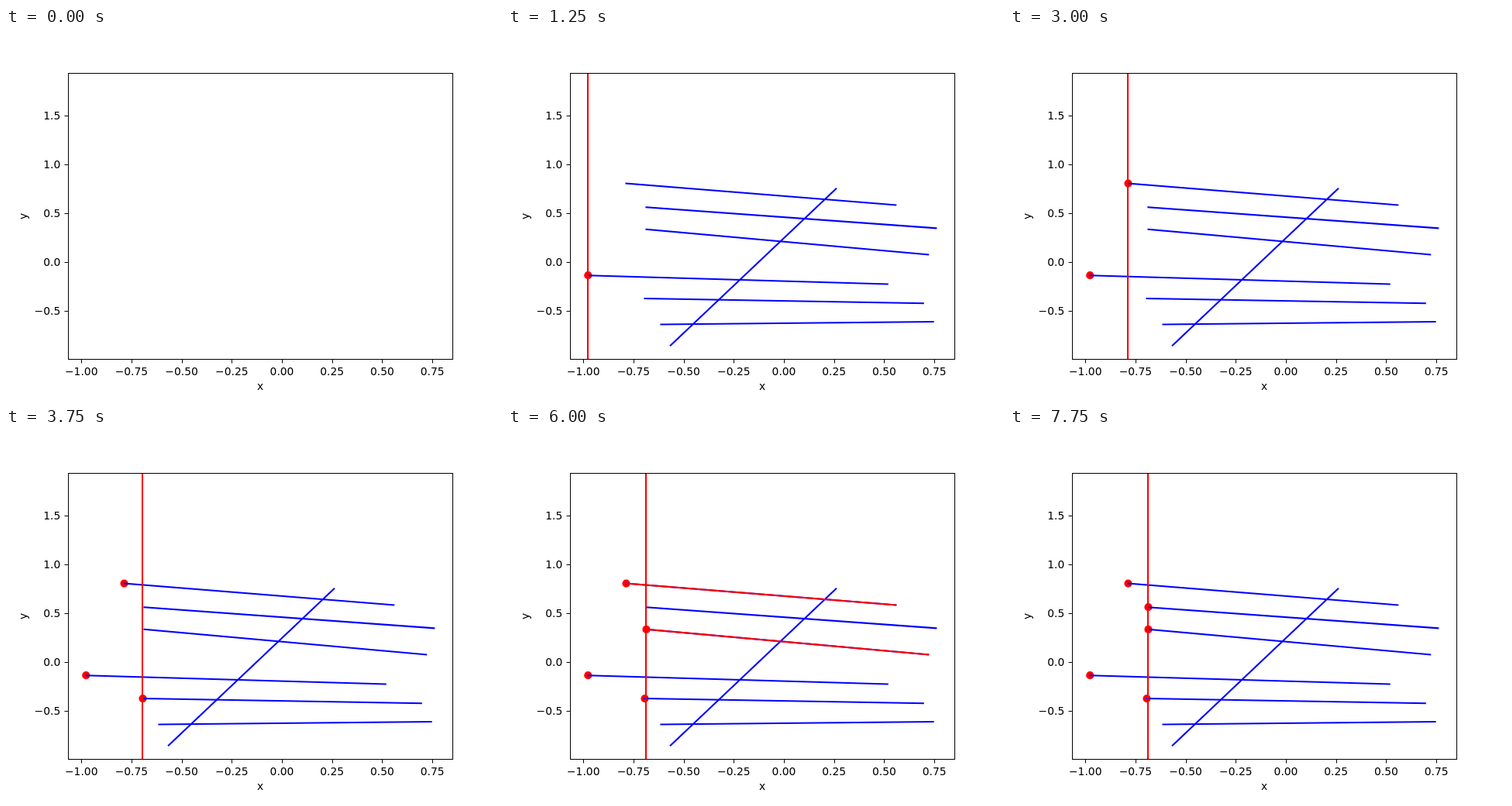
An HTML page with a canvas that plays this animation: 640 by 480 pixels, repeating every 8 s.

```html
<!DOCTYPE html>
<html>
<head>
<meta charset="utf-8">
<style>
html, body { margin: 0; width: 100%; height: 100%; overflow: hidden; background: #fff; }
canvas { display: block; }
</style>
</head>
<body>
<canvas id="stage" width="640" height="480"></canvas>
<script>
const ctx = document.getElementById('stage').getContext('2d');
const STEP = 250, LOOP = 8000;

// Segments as [x1, y1, x2, y2], in the order the sweep meets them
const segments = [
  [103.3, 319.2, 489.7, 330.5],
  [152.5, 200.6, 500.3, 228.4],
  [176.5, 349.1, 535.8, 355.2],
  [178.5, 259.9, 542.2, 292.4],
  [178.5, 231.2, 552.3, 258.3],
  [197.5, 382.5, 548.6, 379.0],
  [209.8, 409.5, 423.2, 207.5]
];
// Active neighbours of each segment when it is inserted
const neighbours = [[], [0], [0], [1, 0], [1, 3]];

// One toggle per step: dot, sweep line, highlights on and off again, line off
const toggles = ['all'];
neighbours.forEach((near, i) => {
  const marks = near.map(n => 'mark' + n);
  toggles.push('dot' + i, 'sweep' + i, 'mark' + i, ...marks, ...marks, 'mark' + i, 'sweep' + i);
});

function stateAt(step) {
  const on = new Set();
  for (const key of toggles.slice(0, step)) on.delete(key) || on.add(key);
  return on;
}

function line(x1, y1, x2, y2, color, width, cap = 'butt') {
  ctx.strokeStyle = color;
  ctx.lineWidth = width;
  ctx.lineCap = cap;
  ctx.beginPath();
  ctx.moveTo(x1, y1);
  ctx.lineTo(x2, y2);
  ctx.stroke();
}

function label(text, x, y, align = 'center') {
  ctx.textAlign = align;
  ctx.fillText(text.replace('-', '\u2212'), x, y);
}

function drawAxes() {
  ctx.fillStyle = '#000';
  ctx.font = '13.89px "DejaVu Sans", sans-serif';
  ctx.textBaseline = 'alphabetic';
  for (let i = 0; i < 8; i++) {
    const x = 97.2 + i * 64.7, px = Math.round(x) + 0.5;
    line(px, 428, px, 432.5, '#000', 1);
    label((i / 4 - 1).toFixed(2), x, 448);
  }
  for (let i = 0; i < 5; i++) {
    const y = 113 + i * 63;
    line(75.5, y + 0.5, 80, y + 0.5, '#000', 1);
    label((1.5 - i / 2).toFixed(1), 70.3, y + 5, 'right');
  }
  label('x', 328, 467);
  ctx.save();
  ctx.translate(27, 243);
  ctx.rotate(-Math.PI / 2);
  label('y', 0, 0);
  ctx.restore();
  ctx.strokeStyle = '#000';
  ctx.lineWidth = 1;
  ctx.strokeRect(80.5, 58.5, 496, 369);
}

function draw(step) {
  const on = stateAt(step);
  ctx.fillStyle = '#fff';
  ctx.fillRect(0, 0, 640, 480);
  ctx.fillStyle = '#f00';
  segments.forEach(([x, y], i) => {
    if (!on.has('dot' + i)) return;
    ctx.beginPath();
    ctx.arc(x, y, 5.1, 0, 2 * Math.PI);
    ctx.fill();
  });
  if (on.has('all')) segments.forEach(s => line(...s, '#00f', 2.08, 'square'));
  segments.forEach((s, i) => {
    const x = Math.floor(s[0]);
    if (on.has('sweep' + i)) line(x, 59, x, 427, '#f00', 2.08);
    if (on.has('mark' + i)) line(...s, '#f00', 2.08, 'square');
  });
  drawAxes();
}

function tick() {
  draw(Math.floor(performance.now() % LOOP / STEP));
  requestAnimationFrame(tick);
}
tick();
</script>
</body>
</html>
```
